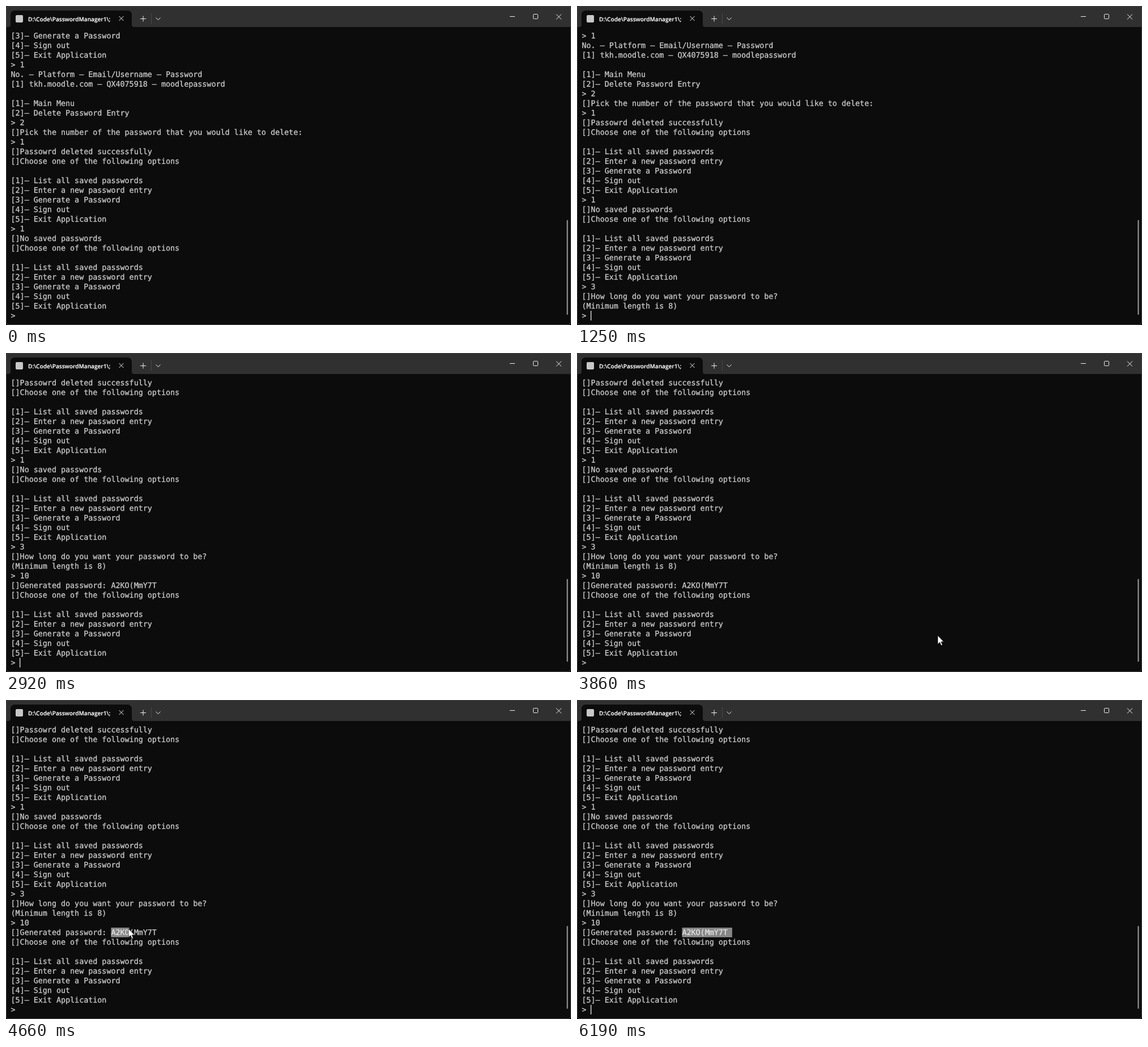
Write an HTML page that moves like this. It is 997 px wide and 562 px high and loops after 6.59 s.

```html
<!DOCTYPE html>
<html lang="en">
<head>
<meta charset="utf-8">
<title>Password manager terminal</title>
<style>
  html, body { margin: 0; width: 100%; height: 100%; overflow: hidden; background: #0c0c0c; }
  svg { display: block; width: 997px; height: 562px; }
  text { white-space: pre; text-rendering: geometricPrecision; }
  #screen { font: 13.36px "DejaVu Sans Mono", monospace; fill: #ccc; stroke: #ccc; stroke-width: .3; }
  .title { font: 600 10.1px "Open Sans", sans-serif; fill: #fff; stroke: #fff; stroke-width: .2; }
  .icons { fill: none; stroke: #f0f0f0; stroke-width: 1; }
</style>
</head>
<body>
<svg viewBox="0 0 997 562">
  <rect width="997" height="562" fill="#0c0c0c"/>
  <rect width="997" height="37" fill="#303030"/>
  <path d="M4 37Q8 37 8 33V16Q8 8 16 8H214Q222 8 222 16V33Q222 37 226 37Z" fill="#0c0c0c"/>
  <rect x="17" y="16" width="13" height="13" rx="2" fill="#c8c8c8"/>
  <text class="title" x="39" y="26.5">D:\Code\PasswordManager1\;</text>
  <g class="icons">
    <path d="M199.5 18l8 8m0-8l-8 8M237 22.5h10M242 17.5v10M264.5 20.5l4 4 4-4"/>
    <path d="M256.5 13v19" stroke="#484848"/>
    <path d="M889 18.5h9M971 14.5l9 9m0-9l-9 9"/>
    <rect x="930.5" y="14.5" width="8" height="8" rx="1"/>
  </g>
  <g id="screen"></g>
  <rect id="selection" y="401" height="17" fill="#fff" fill-opacity=".5"/>
  <rect id="caret" y="537" width="1.2" height="17" fill="#fff"/>
  <rect id="scrollbar" x="989.5" width="2" rx="1" fill="#9d9d9d"/>
  <rect x=".5" y=".5" width="996" height="561" rx="5" fill="none" stroke="#424242"/>
  <g id="mouse">
    <circle id="press" r="10" fill="#e6d714" fill-opacity=".75"/>
    <path d="M0 0V15L3.5 11.8L6 17.5L8.3 16.5L5.8 11H10.5Z" fill="#fff" stroke="#111" stroke-width=".7"/>
  </g>
</svg>
<script>
const LOOP = 6590, ROWS = 30, LEFT = 8.5, CELL = 8.04;
const $ = id => document.getElementById(id);

const choose = ['[]Choose one of the following options', ''];
const menu = ['[1]– List all saved passwords', '[2]– Enter a new password entry',
  '[3]– Generate a Password', '[4]– Sign out', '[5]– Exit Application'];
const history = [...menu.slice(2), '> 1',
  'No. – Platform – Email/Username – Password',
  '[1] tkh.moodle.com – QX4075918 – moodlepassword', '',
  '[1]– Main Menu', '[2]– Delete Password Entry', '> 2',
  '[]Pick the number of the password that you would like to delete:', '> 1',
  '[]Passowrd deleted successfully', ...choose, ...menu, '> 1',
  '[]No saved passwords', ...choose, ...menu];
const askLength = ['> 3', '[]How long do you want your password to be?', '(Minimum length is 8)'];
const generated = ['> 10', '[]Generated password: A2KO(MmY7T', ...choose, ...menu];

const caretToggles = [460, 1850, 2450, 3520, 4060, 4590, 5130, 5650, 6180];
const mouseVisible = [[130, 920], [1660, 2450], [3660, 6190]];
const mousePath = [ // time, x, y
  [130, 889, 548], [520, 816, 504], [3650, 816, 504], [3660, 805, 507],
  [3860, 637, 498], [4260, 430, 405], [4460, 185, 403], [4600, 216, 403],
  [4660, 216, 403], [4990, 330, 409], [5190, 274, 410], [5400, 254, 411],
  [5590, 218, 410], [5720, 185, 409], [5790, 185, 409], [6120, 910, 550]];
const drags = [ // press time, release time, anchor column
  { from: 4460, to: 4600, anchor: 22 },
  { from: 5190, to: 5720, anchor: 33 }];

const rows = Array.from({ length: ROWS }, (_, i) => {
  const row = document.createElementNS('http://www.w3.org/2000/svg', 'text');
  row.setAttribute('x', LEFT);
  row.setAttribute('y', 57 + 17 * i);
  return $('screen').appendChild(row);
});

function set(id, attributes) {
  for (const [name, value] of Object.entries(attributes)) $(id).setAttribute(name, value);
}
const show = (id, on) => set(id, { visibility: on ? 'visible' : 'hidden' });

function mouseAt(t) {
  const next = mousePath.findIndex(p => p[0] > t);
  if (next < 0) return mousePath.at(-1).slice(1);
  if (next === 0) return mousePath[0].slice(1);
  const [a, b] = [mousePath[next - 1], mousePath[next]];
  const k = (t - a[0]) / (b[0] - a[0]);
  return [1, 2].map(i => a[i] + (b[i] - a[i]) * k);
}

function terminalLines(t) {
  if (t < 1250) return [...history, t < 920 ? '> ' : '> 3'];
  if (t < 2920) return [...history, ...askLength, t < 2520 ? '> ' : t < 2580 ? '> 1' : '> 10'];
  return [...history, ...askLength, ...generated, '> '];
}

function drawSelection(t) {
  const drag = drags.findLast(d => t >= d.from);
  if (!drag) return set('selection', { width: 0 });
  const column = Math.round((mouseAt(Math.min(t, drag.to))[0] - LEFT) / CELL);
  set('selection', {
    x: LEFT + CELL * Math.min(column, drag.anchor),
    width: CELL * Math.abs(column - drag.anchor)
  });
}

function draw(t) {
  const lines = terminalLines(t).slice(-ROWS);
  rows.forEach((row, i) => { if (row.textContent !== lines[i]) row.textContent = lines[i]; });

  set('caret', { x: LEFT - .5 + CELL * lines.at(-1).length });
  show('caret', caretToggles.filter(time => time <= t).length % 2);

  const top = t < 1320 ? 377 : t < 2920 ? 382.5 : 398;
  set('scrollbar', { y: top, height: 544 - top });

  // The pointer is sampled at 15 steps per second.
  const sampled = Math.max(0, Math.floor((t + 20) * .015) / .015 - 6);
  set('mouse', { transform: `translate(${mouseAt(sampled)})` });
  const visible = mouseVisible.some(([from, to]) => t >= from && t < to);
  show('mouse', visible);
  show('press', visible && drags.some(d => sampled >= d.from && sampled < d.to));
  drawSelection(sampled);
}

const start = performance.now();
function frame() {
  draw((performance.now() - start) % LOOP);
  requestAnimationFrame(frame);
}
frame();
</script>
</body>
</html>
```
